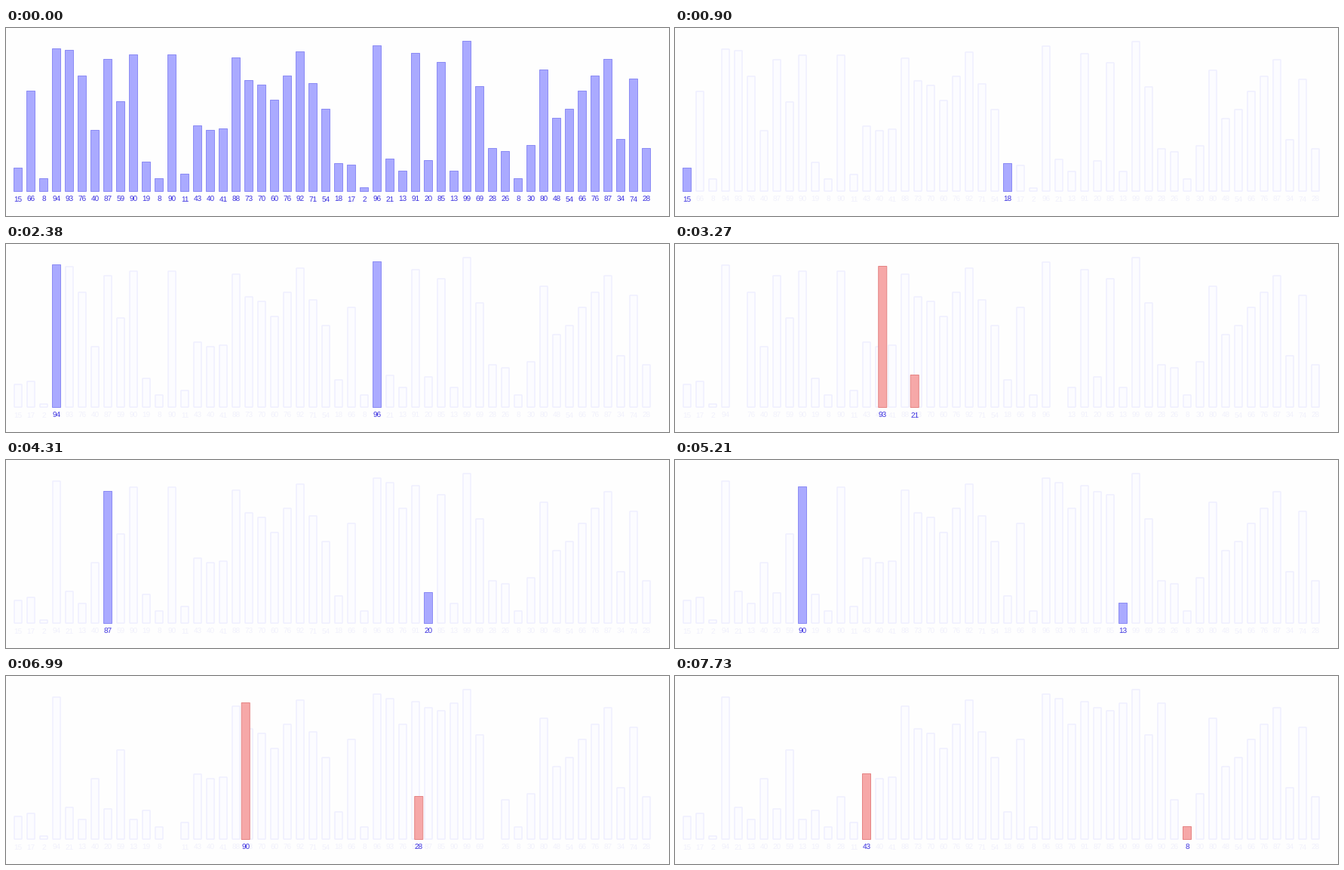
Animation, 879 px wide and 249 px high, one loop 8 s. Source, as a matplotlib script:

```python
"""Shell sort, first pass: pairs a half-length apart are picked, compared and swapped."""
import matplotlib.pyplot as plt
from matplotlib.animation import FuncAnimation
from matplotlib.collections import PolyCollection

W, H, DPI = 879, 249, 64
PX = 72 / DPI                      # one pixel in points
LOOP, INTERVAL = 8000, 20

START, TICK = 900, 148.4           # first highlight and time between redraws (ms)
HOLDS = (4, 8, 13, 18, 22, 25, 30, 34, 38, 42, 47)   # ticks that stay on a step

X0, PITCH, BASE = 16, 17, 216
VALUES = [15, 66, 8, 94, 93, 76, 40, 87, 59, 90, 19, 8, 90, 11, 43, 40, 41,
          88, 73, 70, 60, 76, 92, 71, 54, 18, 17, 2, 96, 21, 13, 91, 20, 85,
          13, 99, 69, 28, 26, 8, 30, 80, 48, 54, 66, 76, 87, 34, 74, 28]
COUNT = len(VALUES)
GAP = COUNT // 2

BACKGROUND = "#fefefe"
BLUE = ("#aaaaff", "#8c8cf4")      # fill, outline
RED = ("#f6a8a8", "#e58484")
PALE = ("#fcfcff", "#eeeeff")
TEXT, PALE_TEXT = "#3a30e0", "#f1f1fc"


def build_steps():
    """List (values, left index, colours, sliding) for every step of the pass."""
    values, steps = list(VALUES), []
    for left in range(GAP):
        right = left + GAP
        steps.append((list(values), left, BLUE, False))
        steps.append((list(values), left, RED, False))
        if values[left] > values[right]:
            steps.append((list(values), left, RED, True))
            values[left], values[right] = values[right], values[left]
    return steps


STEPS = build_steps()


def bar(x, value, grow=0.0):
    left, right = x - 5 - grow, x + 5 + grow
    top, bottom = BASE - 2 * value - grow, BASE + grow
    return [(left, bottom), (left, top), (right, top), (right, bottom)]


def scene(time):
    """Return values, x positions, highlighted indices and their colours."""
    xs = [X0 + PITCH * i for i in range(COUNT)]
    if time < START:
        return VALUES, xs, list(range(COUNT)), BLUE
    tick = int((time - START) / TICK)
    passed = [h for h in HOLDS if h <= tick]
    values, left, colours, sliding = STEPS[tick - len(passed)]
    right = left + GAP
    if sliding:
        since_hold = tick - (passed[-1] if passed else 0)
        shift = (0.89 - 0.22 * since_hold) * GAP * PITCH
        xs[left] += shift
        xs[right] -= shift
    return values, xs, [left, right], colours


plt.rcParams["text.hinting"] = "none"
fig = plt.figure(figsize=(W / DPI, H / DPI), dpi=DPI, facecolor=BACKGROUND)
ax = fig.add_axes([0, 0, 1, 1])
ax.set(xlim=(0, W), ylim=(H, 0))
ax.axis("off")


def add_bars(width, zorder):
    bars = PolyCollection([], linewidths=width * PX, joinstyle="miter",
                          snap=False, zorder=zorder)
    ax.add_collection(bars, autolim=False)
    return bars


pale_bars = add_bars(1.4, 1)
bright_bars = add_bars(1, 2)
labels = [ax.text(0, 230, "", ha="center", va="baseline", fontsize=10 * PX,
                  family="Liberation Sans") for _ in VALUES]


def paint(bars, verts, colours):
    bars.set_verts(verts)
    bars.set_facecolor(colours[0])
    bars.set_edgecolor(colours[1])


def update(frame):
    values, xs, active, colours = scene(frame * INTERVAL + 14)
    resting = [i for i in range(COUNT) if i not in active]
    paint(pale_bars, [bar(xs[i], values[i]) for i in resting], PALE)
    paint(bright_bars, [bar(xs[i], values[i], 0.5) for i in active], colours)
    for i, label in enumerate(labels):
        bright = i in active
        label.set_text(str(values[i]))
        label.set_x(xs[i])
        label.set_color(TEXT if bright else PALE_TEXT)
        label.set_zorder(4 if bright else 3)
    return [pale_bars, bright_bars, *labels]


anim = FuncAnimation(fig, update, frames=LOOP // INTERVAL, interval=INTERVAL,
                     repeat=True, repeat_delay=0, blit=False)
plt.show()
```
